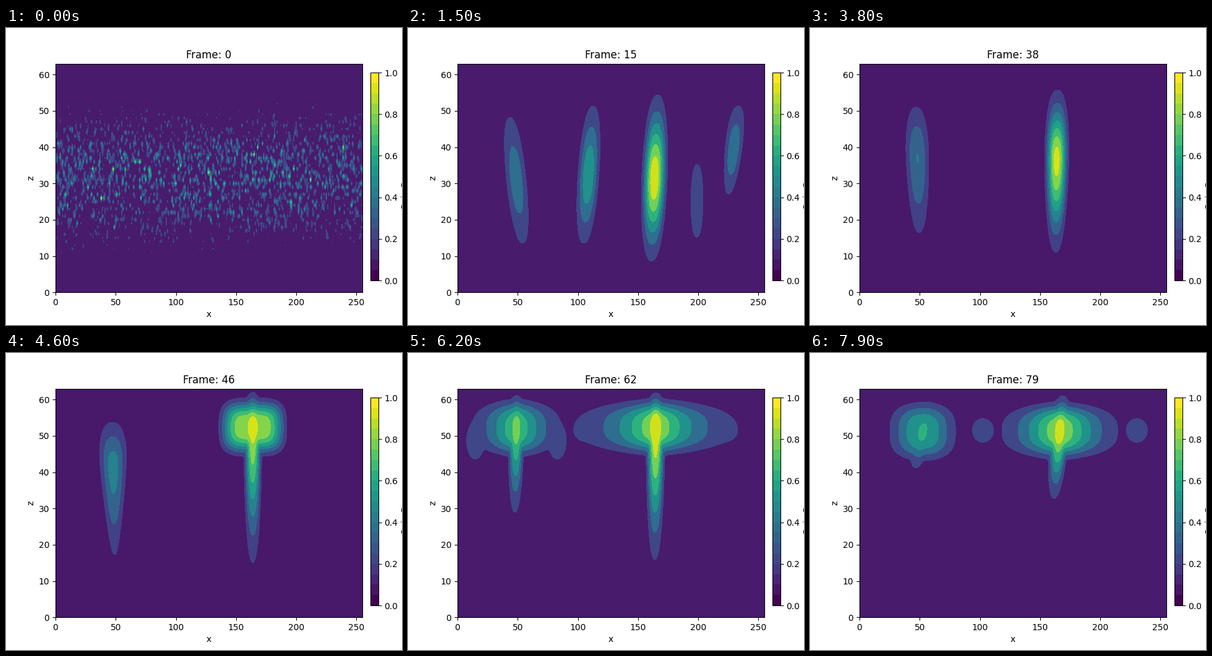
Animation, 640 px wide and 480 px high, one loop 8 s. Source, as a matplotlib script:

```python
import numpy as np
import matplotlib.pyplot as plt
from matplotlib.animation import FuncAnimation
from matplotlib.cm import ScalarMappable

FRAMES, INTERVAL = 80, 100
NX, NZ = 256, 64
X, Z = np.meshgrid(np.arange(NX), np.arange(NZ))
DRIFT_T, LOBE_T = (15, 56, 79), (50, 56, 79)

# Stem keys: time, tilt, z of peak, falloff below (1e-3), peak, width
LEFT_STEM = [(15, -.305, 31.2, 3.08, 2.62, 8.3),
             (29, -.1, 31.7, 3.25, 2.59, 7.9),
             (46, -.05, 42, 2, 3.4, 10),
             (56, -.07, 53, 1.35, 6, 5.2),
             (69, .18, 52.5, 4.7, 4.2, 5.5),
             (79, .6, 51, 13, 3.5, 7)]
RIGHT_STEM = [(15, .11, 31.5, 3.67, 6.82, 8),
              (28, .05, 31.7, 3.6, 7.5, 7.9),
              (36, .04, 32.5, 3.5, 7.55, 7.9),
              (46, 0, 53, 1.36, 7.05, 5.7),
              (56, 0, 53, 1.35, 7.05, 6.5),
              (72, .05, 53, 1.45, 6.2, 5.2),
              (79, .25, 52, 4.9, 6.1, 6.3)]

# Cap keys: time, peak, width, sharpness
LEFT_CAP = [(47, 0, 8, 3), (50, 3.5, 14, 2.5), (55, 5.8, 26.5, 1.4),
            (69, 4.1, 26, 1.55), (79, 3.95, 23.6, 2.2)]
RIGHT_CAP = [(38, 0, 9, 3), (42, 6, 13, 3.4), (46, 6.9, 24, 4), (50, 6.9, 36, 1.9),
             (55, 6.9, 36.5, 1.2), (69, 5.9, 39, 1.1), (79, 6, 32.5, 1.5)]

noise = np.random.default_rng(7).standard_normal((NZ, NX))
spectrum = np.fft.fft2(noise)
KX, KZ = np.meshgrid(np.fft.fftfreq(NX), np.fft.fftfreq(NZ))
envelope = np.exp(-((Z - 31.5) / 16.5) ** 2)


def at(rows, t):
    keys, *cols = np.array(rows, float).T
    return [np.interp(t, keys, c) for c in cols]


def stem(x, tilt, z, below, peak, width):
    dz = Z - z
    above = max(below, 3.6 * np.exp((z - 32) / 11))
    flare = .02 * np.exp(-((z - 43) / 5) ** 2)
    w = width * np.maximum(1 + flare * dz, .3)
    dx = np.abs(X - x - tilt * dz)
    fall = np.where(dz < 0, below, above) * 1e-3
    return peak * np.exp(-fall * dz ** 2 - (dx / w) ** 2.3)


def cap(x, z, peak, width, sharp):
    h = 8 / np.log(max(peak, 2.5)) ** (1 / 3)
    return peak * np.exp(-(np.abs(X - x) / width) ** sharp - (np.abs(Z - z) / h) ** 3)


def lobes(x, z, peak, offset, width):
    dx = np.abs(X - x) - offset
    return peak * np.exp(-(dx / width) ** 2 - ((Z - z) / 6) ** 2)


def plume(t, drift, stem_keys, cap_keys, lobe_peak, lobe_dx, lobe_z, lobe_w):
    x = np.interp(t, DRIFT_T, drift)
    tilt, z, *rest = at(stem_keys, t)
    return [stem(x, tilt, z, *rest),
            cap(x, max(z - .6, 51.2), *at(cap_keys, t)),
            lobes(x, lobe_z, np.interp(t, LOBE_T, lobe_peak),
                  np.interp(t, LOBE_T, lobe_dx), lobe_w)]


def fading(t, end, x, tilt, z, below, peak, width):
    left = np.clip((end - t) / (end - 15), 0, 1)
    return stem(x, tilt * left ** .5, z, below, peak * left, width * max(left, .01) ** .25)


def plumes(t):
    parts = plume(t, (48.8, 47.6, 52.5), LEFT_STEM, LEFT_CAP,
                  (0, 2.3, .9), (34, 39, 20), 48.5, 9)
    parts += plume(t, (163.7, 164, 166.5), RIGHT_STEM, RIGHT_CAP,
                   (0, 1, 1.35), (60, 60, 64), 51.5, 16)
    parts += [fading(t, 40, 108.8, .204, 32.4, 3.75, 3.81, 7.7),
              fading(t, 23, 199, .02, 25.2, 3.7, 1.45, 7.8),
              fading(t, 26, 229.3, .33, 39.3, 6.8, 2.76, 6.9)]
    return sum(p ** 6 for p in parts) ** (1 / 6)


def turbulence(t):
    sx, sz = .45 * t, 1.1 * t
    blur = np.exp(-2 * np.pi ** 2 * ((KX * sx) ** 2 + (KZ * sz) ** 2))
    f = np.maximum(np.fft.ifft2(spectrum * blur).real, 0) * envelope
    return 6.8 * f / f.max()


def field(t):
    if t >= 15:
        return plumes(t)
    mix = (t / 15) ** 1.3
    f = mix * plumes(t) + (1 - mix) * turbulence(t)
    return 6.8 * f / f.max()


fig, ax = plt.subplots(figsize=(6.4, 4.8), dpi=100)
cax = fig.add_axes([.92, .15, .02, .7])
bar = fig.colorbar(ScalarMappable(cmap=plt.get_cmap("viridis", 20)), cax=cax)
bar.set_label("Rain Buoyancy")
ax.set(xlabel="x", ylabel="z", xlim=(0, NX - 1), ylim=(0, NZ - 1))
title = ax.set_title("Frame: 0")
drawn = []


def update(i):
    while drawn:
        drawn.pop().remove()
    bands = 8 if 28 <= i < 62 else 7
    f = np.minimum(field(i), bands - .01)
    drawn.append(ax.contourf(X, Z, f, levels=np.arange(bands + 1), cmap="viridis"))
    title.set_text(f"Frame: {i}")
    return drawn + [title]


anim = FuncAnimation(fig, update, frames=FRAMES, interval=INTERVAL,
                     init_func=lambda: [], repeat=True, repeat_delay=0)
plt.show()
```
